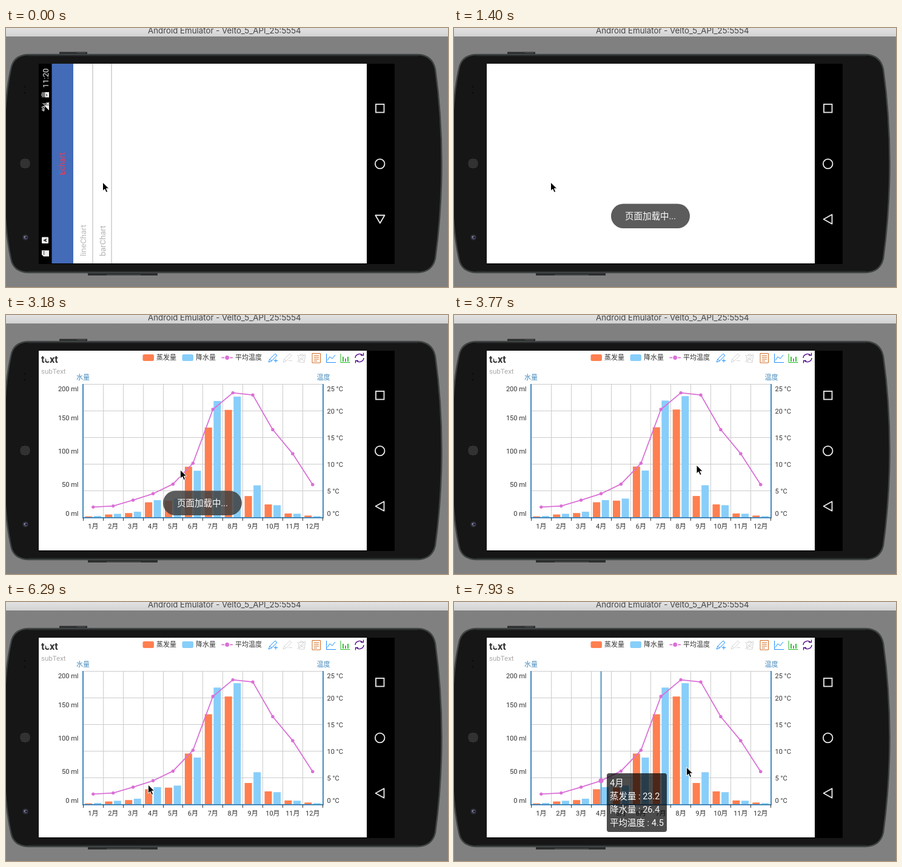
Recreate the animation shown at these times as an HTML page. Size 729 px wide and 428 px high, loop 8000 ms.

```html
<!DOCTYPE html>
<html lang="en">
<head>
<meta charset="utf-8">
<title>Chart demo</title>
<style>
html, body { margin: 0; width: 100%; height: 100%; overflow: hidden; background: #808080; }
svg { display: block; width: 729px; height: 428px; }
text { font-family: Roboto, "Noto Sans CJK SC", "Noto Sans CJK", sans-serif; }
.bar-title { font: 13.3px Inter, sans-serif; }
</style>
</head>
<body>
<svg id="stage" viewBox="0 0 729 428" xmlns="http://www.w3.org/2000/svg"></svg>
<script>
const LOOP = 8000;
const rain = [2.6, 5.9, 9, 26.4, 28.7, 70.7, 175.6, 182.2, 48.7, 18.8, 6, 2.3];
const evap = [2, 4.9, 7, 23.2, 25.6, 76.7, 135.6, 162.2, 32.6, 20, 6.4, 3.3];
const temp = [2, 2.2, 3.3, 4.5, 6.3, 10.2, 20.3, 23.4, 23, 16.5, 12, 6.2];
const LEFT = 127.4, RIGHT = 522.2, TOP = 114.5, BASE = 335, CELL = (RIGHT - LEFT) / 12;
const AXIS = '#4488bb', ORANGE = '#ff7f50', BLUE = '#87cefa', PINK = '#da70d6';

const rect = (x, y, w, h, fill, more = '') =>
  `<rect x="${x}" y="${y}" width="${w}" height="${h}" fill="${fill}" ${more}/>`;
const circle = (x, y, r, fill, more = '') =>
  `<circle cx="${x}" cy="${y}" r="${r}" fill="${fill}" ${more}/>`;
const line = (d, stroke, w = 1, more = '') =>
  `<path d="${d}" fill="none" stroke="${stroke}" stroke-width="${w}" ${more}/>`;
const text = (x, y, s, size, fill, more = '') =>
  `<text x="${x}" y="${y}" font-size="${size}" fill="${fill}" ${more}>${s}</text>`;
const upText = (x, y, s, size, fill, more = '') =>
  text(0, 0, s, size, fill, `transform="translate(${x} ${y}) rotate(-90)" ${more}`);
const MID = 'text-anchor="middle"', END = 'text-anchor="end"';
const range = n => [...Array(n).keys()];
const midX = i => LEFT + (i + .5) * CELL;
const tempY = v => BASE - v * (BASE - TOP) / 25;
const crisp = v => Math.floor(v) + .5;

function phone() {
  const body = 'M-2 150C0 112 4 86 8 68Q12 45 36 44H680Q703 45 708 68C715 118 718.5 170 718.5 224' +
    'C718.5 280 715 330 708 381Q703 403 680 404H36Q12 403 8 381C4 362 0 336 -2 300Z';
  const holes = range(49).map(i => {
    const dx = (i % 7 - 3) * 2.5, dy = (Math.floor(i / 7) - 3) * 2.5;
    return Math.hypot(dx, dy) < 8.5 ? circle(31.5 + dx, 224 + dy, .8, '#050505') : '';
  }).join('');
  return rect(0, 0, 729, 428, '#808080') +
    rect(0, 0, 729, 14, 'url(#titlebar)') +
    text(234, 9, 'Android Emulator - Velto_5_API_25:5554', 13.3, '#444', 'class="bar-title"') +
    rect(88, 39.5, 46, 6, '#2c2e2e') + rect(117, 39.5, 14, 2, '#484a4a') +
    rect(135, 402, 115, 7, '#2c2e2e') + rect(166, 407, 56, 2, '#434545') +
    `<path d="${body}" fill="#161616" stroke="#3f4343" stroke-width="2.4"/>` +
    line('M36 46H680M36 402H680', '#252727', 1.5) +
    circle(31.5, 224, 8.5, '#444') + holes +
    circle(31, 97, 1.3, '#0a0a0a') + circle(31, 107, 1.3, '#0a0a0a') +
    circle(32, 346, 4.8, '#2b2d32') + circle(32.5, 346, 3, '#54547a') +
    circle(33.5, 346, 1.6, '#181820') + circle(30.5, 345.3, 1.1, '#9a9ab0') +
    rect(54, 59, 587, 331, '#000');
}

function navButtons(triangle) {
  const w = '#ececec';
  return rect(610, 126, 13.5, 13.5, 'none', `stroke="${w}" stroke-width="1.8"`) +
    circle(616.7, 224.5, 7.8, 'none', `stroke="${w}" stroke-width="1.8"`) +
    line(triangle, w, 1.8, 'stroke-linejoin="round"');
}

function listScreen() {
  const w = '#eee';
  return rect(54, 59, 587, 331, '#000') +
    rect(75.5, 59, 36, 330, '#446bb8') + rect(111, 59, 484, 330, '#fff') +
    rect(143, 59, 31, 330, '#ffda85', 'id="pressed"') +
    rect(142.3, 59, 1.3, 330, '#c4c4c4') + rect(173.4, 59, 1.3, 330, '#c4c4c4') +
    upText(97, 224.5, 'Echart', 13, '#f63b4e', MID) +
    upText(132, 377, 'lineChart', 13, '#b9b9b9') +
    upText(163.5, 377, 'barChart', 13, '#b0b0b0') +
    upText(69.5, 99, '11:20', 13, w) +
    upText(64, 138, '4G', 7.5, w, 'font-weight="700"') +
    `<path d="M71 136V124L59 124Z" fill="#777"/><path d="M71 136V128L63 128Z" fill="${w}"/>` +
    line('M67 123l4 4m0 -4l-4 4', w, 1.2) +
    rect(59, 106, 12, 8.5, '#777') + rect(64.5, 106, 6.5, 8.5, w) + rect(58, 108.5, 1.5, 3.5, '#777') +
    line('M66 109l2 2-2 1', '#222') +
    rect(59, 345.5, 11, 10.5, w, 'rx="1"') + upText(67.4, 350.7, 'A', 8, '#000', `font-weight="700" ${MID}`) +
    `<path d="M59 367.5H71V377.5H62L59 374.5Z" fill="${w}"/>` +
    line('M61 369.5h3m-3 2.2h3m-3 2.2h3', '#333', .8) +
    navButtons('M609.3 309.5H624.5L616.9 322.5Z') +
    `<g id="dim">${rect(53, 58, 83, 333, '#000')}${rect(556, 58, 86, 333, '#000')}</g>`;
}

function toolbox() {
  const pencil = (x, c, sign) => line(`M${x} 78l2-5 9-9 3 3-9 9-5 2m2-5l3 3`, c) + line(sign, c);
  const pale = '#d4d4d4', sky = '#1e90ff', brown = '#d2691e', green = '#22bb22';
  return pencil(433, sky, 'M442 75.5h6m-3 -3v6') + pencil(457, pale, 'M466 75.5h6') +
    line('M480 67h15m-10 0v-2h5v2M482 68l1.5 10h8.5l1.5-10M484 70l8 6m0-6l-8 6M494 64l-14 14', pale) +
    line('M505 63.5h13.5v15.5H505ZM508 67h8m-8 3h8m-8 3h8m-8 3h5', brown) +
    line('M528.5 64v14.5h15.5M530 75l4-6 4 3 5-6', sky) +
    line('M552 64v14.5h15.5', green) +
    line('M556 77v-8M560 77v-5M564 77v-8', green, 1.8) +
    line('M576 71a7 6.5 0 0 1 12-4.5m2 4.5a7 6.5 0 0 1-12 4.5M585 66.5h4.5v-4M581 75.5h-4.5v4', '#4b0082', 1.3);
}

function chart() {
  let grid = '', labels = '', bars = '';
  for (let i = 0; i <= 12; i++) {
    const x = crisp(LEFT + i * CELL);
    grid += `M${x} ${TOP}V${BASE}`;
    labels += line(`M${x} ${BASE}v5`, '#333');
  }
  for (let i = 1; i <= 5; i++) grid += `M${LEFT} ${crisp(tempY(i * 5))}H${RIGHT}`;
  range(12).forEach(i => {
    const x = LEFT + i * CELL;
    bars += rect(x + 3, 0, 12, 0, ORANGE, `data-v="${evap[i]}" class="col"`) +
      rect(x + 17.6, 0, 12, 0, BLUE, `data-v="${rain[i]}" class="col"`);
    labels += text(midX(i), 352.5, `${i + 1}月`, 11, '#333', MID);
  });
  const nudge = (y, first, last) => y + 4 + (first ? -7 : last ? 7 : 0);
  range(5).forEach(i => {
    labels += text(119.5, nudge(BASE - i * 55.1, i == 0, i == 4), `${i * 50} ml`, 11, '#333', END);
  });
  range(6).forEach(i => {
    labels += text(529.5, nudge(tempY(i * 5), i == 0, i == 5), `${i * 5} °C`, 11, '#333');
  });
  const dots = range(12).map(i => circle(midX(i), tempY(temp[i]), 2.7, PINK)).join('');
  return text(58, 78.5, 'text', 16, '#333', 'font-weight="700"') + rect(63.8, 66, 8.4, 8.8, '#fff') +
    circle(65.3, 73.2, 1, '#333') +
    text(58, 97, 'subText', 11.5, '#aaa') +
    rect(225.5, 65, 18.5, 11, ORANGE, 'rx="2.5"') + text(248, 74, '蒸发量', 11, '#333') +
    rect(290.5, 65, 18.5, 11, BLUE, 'rx="2.5"') + text(313, 74, '降水量', 11, '#333') +
    line('M355.5 70.5h18.5', PINK, 1.8) + circle(364.7, 70.5, 4.6, '#fff') + circle(364.7, 70.5, 3.4, PINK) +
    text(378, 74, '平均温度', 11, '#333') + toolbox() +
    text(127, 107, '水量', 11, AXIS, MID) + text(523.5, 107, '温度', 11, AXIS, MID) +
    line(grid, '#ccc') + bars +
    line(`M127 ${TOP - .5}V${BASE}H523V${TOP - .5}`, AXIS, 2) + labels +
    line('', AXIS, 1.8, 'id="pointer"') + line('', PINK, 1.8, 'id="curve" stroke-linejoin="round"') +
    `<g id="dots">${dots}${circle(0, 0, 4, PINK, 'id="hot"')}</g><g id="tip"></g>`;
}

const stage = document.getElementById('stage');
stage.innerHTML = `<defs>
  <linearGradient id="titlebar" x2="0" y2="1"><stop stop-color="#e2e2e2"/><stop offset="1" stop-color="#d2d2d2"/></linearGradient>
  <clipPath id="screen"><rect x="54" y="59" width="587" height="331"/></clipPath></defs>` +
  phone() + `<g clip-path="url(#screen)"><g id="list">${listScreen()}</g>
  <g id="page">${rect(54, 59, 541, 330, '#fff')}${navButtons('M609.5 316L623.5 308.3V323.7Z')}
  <g id="chart">${chart()}</g>
  <g id="toast">${rect(259, 290.5, 130, 40.5, '#404040', 'rx="20.2" opacity=".85"')}
  ${text(324, 316, '页面加载中...', 14.5, '#fff', MID)}</g></g></g>
  <path id="cursor" d="M0 0V14.2L3.3 11.2L5.7 16.6L8.2 15.5L5.8 10.2H10.3Z" fill="#000" stroke="#fff" stroke-width="1"/>`;

const $ = id => document.getElementById(id);
const cols = [...stage.querySelectorAll('.col')];
const show = (id, on) => $(id).setAttribute('display', on ? 'inline' : 'none');
const clamp = v => Math.max(0, Math.min(1, v));
const expOut = k => k <= 0 ? 0 : k >= 1 ? 1 : 1 - 2 ** (-10 * k);

// Linear track through [time, ...values] keys, held at both ends.
function track(keys, t) {
  if (t <= keys[0][0]) return keys[0].slice(1);
  for (let i = 1; i < keys.length; i++) {
    const a = keys[i - 1], b = keys[i];
    if (t < b[0]) return b.slice(1).map((v, j) => a[j + 1] + (v - a[j + 1]) * (t - a[0]) / (b[0] - a[0]));
  }
  return keys[keys.length - 1].slice(1);
}

const cursorKeys = [[2879, 159.5, 255], [3176, 287.5, 256], [3622, 400, 248], [4958, 400, 248],
  [5255, 219, 296], [6150, 219, 296], [6294, 234.5, 302], [6442, 243, 304], [7037, 243, 304],
  [7482, 382.5, 280], [7850, 382.5, 280], [7928, 383.5, 273]];
const tips = [
  { from: 4450, to: 5800, i: 8, w: 95, keys: [[4512, 400, 249], [4660, 402, 251], [4958, 417, 256]] },
  { from: 6700, to: 9000, i: 3, w: 99, keys: [[6740, 258, 292], [7186, 252, 283]] }
];

const snap = t => t < 800 ? t : 800 + 148.5 * Math.floor((t - 789) / 148.4);

function drawTip(t) {
  const tip = tips.find(p => t >= p.from && t < p.to);
  ['tip', 'pointer', 'hot'].forEach(id => show(id, !!tip));
  if (!tip) return;
  const { i, w, keys } = tip, [x, y] = track(keys, t);
  const rows = [`${i + 1}月`, `蒸发量 : ${evap[i]}`, `降水量 : ${rain[i]}`, `平均温度 : ${temp[i]}`];
  $('tip').innerHTML = rect(x, y, w, 97, '#000', 'rx="4" opacity=".7"') +
    rows.map((s, n) => text(x + 5, y + 21 + n * 22, s, 14.5, '#fff')).join('');
  $('pointer').setAttribute('d', `M${midX(i)} ${TOP}V${BASE}`);
  $('hot').setAttribute('cx', midX(i));
  $('hot').setAttribute('cy', tempY(temp[i]));
}

function draw(time) {
  const t = snap(time);
  const [turn] = track([[799, 0], [800, .49], [948, .87], [1096, 1]], t);
  show('list', turn < 1);
  show('page', turn >= 1);
  show('pressed', t >= 500);
  $('dim').setAttribute('opacity', turn ? clamp(.5 + (turn - .49) * .8) : 0);
  const ratio = 587 / 331;
  $('list').setAttribute('transform', `translate(347.5 224.5) rotate(${90 * turn}) ` +
    `scale(${1 + (1 / ratio - 1) * turn} ${1 + (ratio - 1) * turn}) translate(-347.5 -224.5)`);

  show('chart', t >= 1530);
  const grow = t >= 4450 ? 1 : expOut((t - 1546) / 2000);
  cols.forEach(c => {
    const h = c.dataset.v * 1.1025 * grow;
    c.setAttribute('y', BASE - h);
    c.setAttribute('height', Math.max(0, h - 1));
  });
  const rise = t >= 3150 ? 1 : expOut((t - 1584) / 2000);
  const floor = tempY(temp[0]);
  $('curve').setAttribute('d', 'M' + temp.map((v, i) =>
    `${midX(i)} ${floor + (tempY(v) - floor) * rise}`).join('L'));
  show('dots', t >= 3150);
  drawTip(t);

  $('toast').setAttribute('opacity', track([[1096, 0], [1394, 1], [3325, 1], [3770, 0]], t)[0]);
  const [x, y] = track(cursorKeys, t);
  $('cursor').setAttribute('transform', `translate(${x} ${y})`);
}

const start = performance.now();
function tick() {
  draw((performance.now() - start) % LOOP);
  requestAnimationFrame(tick);
}
tick();
</script>
</body>
</html>
```
